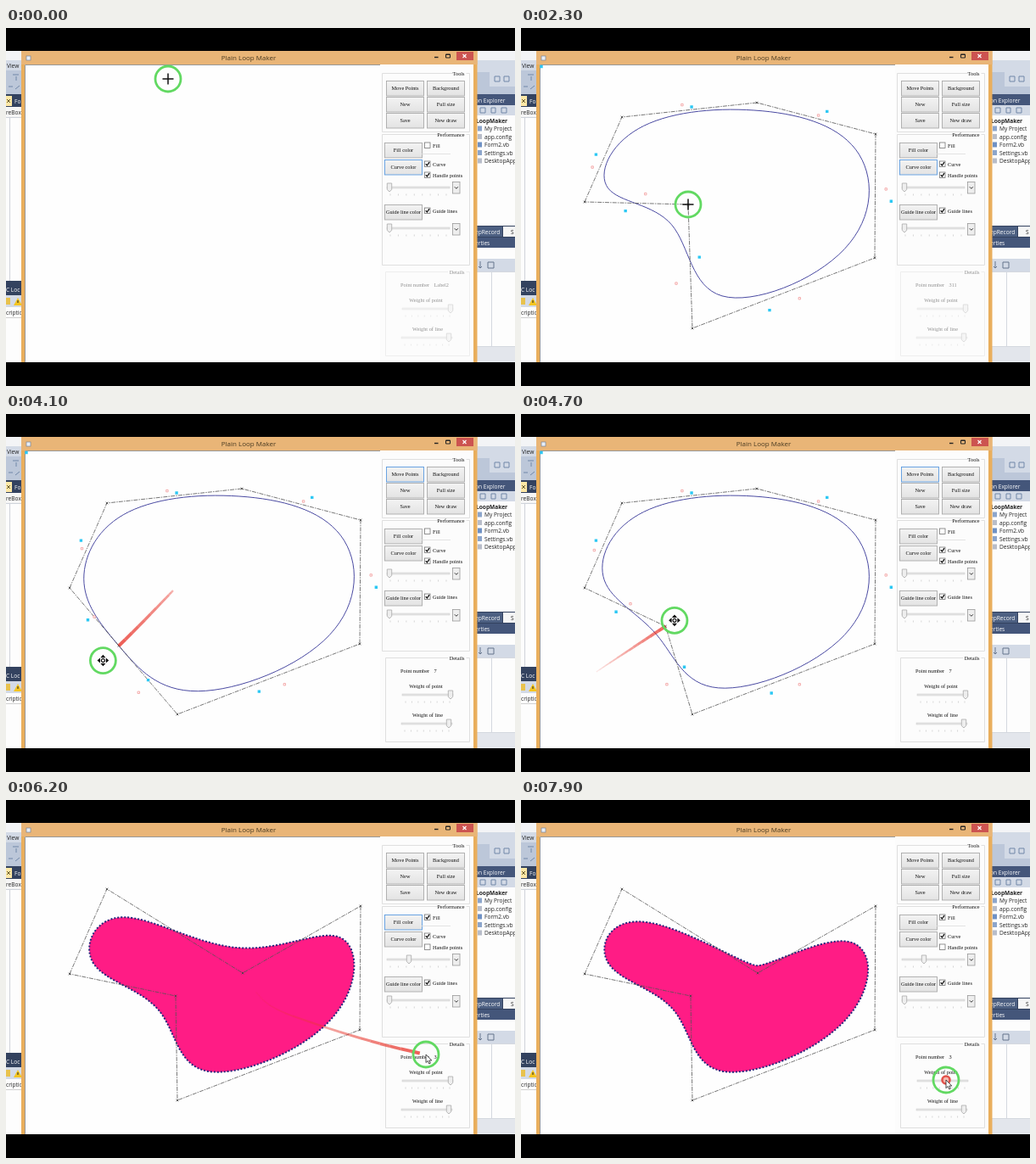
Recreate the animation shown at these times as an HTML page. Size 600 by 422 pixels, loop 8 s.

```html
<!DOCTYPE html>
<html lang="en">
<head>
<meta charset="utf-8">
<title>Spline drawing</title>
<style>
html, body { margin: 0; width: 100%; height: 100%; overflow: hidden; background: #000; }
svg { display: block; width: 100vw; height: 100vh; }
.ui { font: 6.3px "Liberation Serif", "Noto Serif", serif; fill: #111; }
.ide { font: 6.6px "Open Sans", "Noto Sans", sans-serif; fill: #222; }
.title { font: 8px "Open Sans", "Noto Sans", sans-serif; fill: #4a3b22; }
</style>
</head>
<body>
<svg id="stage" viewBox="0 0 600 422"></svg>
<script>
const LOOP = 8000;
const stage = document.getElementById('stage');

// ---- markup helpers ----
const rect = (x, y, w, h, fill, extra = '') =>
  `<rect x="${x}" y="${y}" width="${w}" height="${h}" fill="${fill}" ${extra}/>`;
const line = (d, stroke, extra = '') => `<path d="${d}" fill="none" stroke="${stroke}" ${extra}/>`;
const text = (x, y, str, cls = 'ui', extra = '') =>
  `<text x="${x}" y="${y}" class="${cls}" ${extra}>${str}</text>`;
const centered = 'text-anchor="middle"';

const button = (id, x, y, label) =>
  rect(x + .5, y + .5, 44, 17.5, 'url(#btn)', `id="${id}" stroke="#aaa" stroke-width=".9"`) +
  text(x + 22.5, y + 11, label, 'ui', centered);

const group = (x, y, w, h, label) => {
  const gap = label.length * 2.9;
  return line(`M${x + w - 5 - gap} ${y}H${x}V${y + h}H${x + w}V${y}h-4`, '#dcdcdc', 'stroke-width=".9"') +
    text(x + w - 6, y + 2, label, 'ui', 'text-anchor="end"');
};

const check = (id, y, label) =>
  rect(493.5, y - 3.5, 6.5, 6.5, '#fff', 'stroke="#777" stroke-width=".8"') +
  line(`M494.8 ${y - .3}l1.6 1.8 2.6 -3.8`, '#111', `id="${id}" stroke-width="1.3"`) +
  text(503, y + 2, label);

const thumb = (id, x, y) => `<path id="${id}" transform="translate(${x} ${y})"
  d="M-2.7 -5H2.7V2.5L0 5L-2.7 2.5Z" fill="#eee" stroke="#aaa" stroke-width=".8"/>`;
const slider = (id, x, y, w, at) => {
  let ticks = '';
  for (let i = 0; i < 8; i++) ticks += `M${x + 4 + i * (w - 8) / 7} ${y + 7.5}v2`;
  return rect(x, y - 1, w, 2, '#e4e4e4', 'stroke="#ccc" stroke-width=".5"') +
    line(ticks, '#ccc', 'stroke-width=".8"') + thumb(id, at, y);
};
const dropdown = y => rect(526.5, y + .5, 8.5, 13.5, '#eee', 'stroke="#999" stroke-width=".8"') +
  line(`M528.8 ${y + 6.3}l2 2 2 -2`, '#333', 'stroke-width="1"');

// ---- static scene ----
function backdrop() {
  const files = ['My Project', 'app.config', 'Form2.vb', 'Settings.vb', 'DesktopApp'];
  return rect(0, 27, 600, 367, '#fdfdfd') +
    // left edge
    rect(0, 27, 18, 11, '#f3f4f6') + rect(0, 38, 18, 12, '#d3dae6') + text(1, 47, 'View', 'ide') +
    rect(0, 50, 18, 28, '#bcc7d9') + line('M8 55h7M12 62v-5M3 69h5M11 72l5 -4', '#7187a8') +
    rect(0, 78, 18, 15, '#33425f') + rect(0, 80, 7, 12, '#ffe8a6') +
    line('M1 84l4 4m0 -4l-4 4', '#6b5a2a') + text(10, 89, 'Fo', 'ide', 'style="fill:#fff"') +
    rect(0, 93, 18, 12, '#f6f6f6') + text(0, 102, 'reBox2', 'ide') +
    line('M0 105.5h18M4.5 106v192', '#cfd3da') + rect(0, 298, 18, 17, '#33425f') +
    text(0, 311, 'C Loc', 'ide', 'style="fill:#fff"') + rect(0, 315, 18, 14, '#d3dae6') +
    rect(0, 318, 5, 8, '#e8c24d') + '<path d="M9 327l5 -9 5 9z" fill="#f4c520"/>' +
    line('M14 321v3', '#222') + text(0, 338, 'cription', 'ide') + line('M0 341.5h18', '#d0d0d0') +
    // right edge
    rect(555, 27, 45, 11, '#f3f4f6') + rect(555, 38, 45, 14, '#d3dae6') + rect(555, 52, 45, 26, '#bcc7d9') +
    rect(570, 51, 30, 18, '#d3dae6') +
    line('M576 57h6v6h-6zM587 57h6v6h-6z', '#7187a8') + rect(555, 78, 45, 13, '#44567a') +
    text(553, 88, 'on Explorer', 'ide', 'style="fill:#fff"') + rect(555, 91, 45, 12, '#d3dae6') +
    line('M559 94h6v6h-6zM572 94h5v6h-5zM584 94h6v6h-6z', '#7187a8') +
    text(554, 111.5, 'LoopMaker', 'ide', 'style="font-weight:bold"') +
    files.map((name, i) => rect(556, 115.5 + i * 9.5, 5, 6, ['#8ca5cb', '#b8bdc9', '#6f91c4'][i % 3]) +
      text(564, 121.3 + i * 9.5, name, 'ide')).join('') +
    rect(555, 233, 45, 14, '#33425f') + rect(555, 234, 30, 12, '#4d6082') +
    text(553, 243, 'epRecord', 'ide', 'style="fill:#fff"') + rect(586, 234, 14, 12, '#f6f6f6') +
    text(595, 243, 'S', 'ide') + rect(555, 247, 45, 12, '#44567a') +
    text(553, 256, 'erties', 'ide', 'style="fill:#fff"') + rect(555, 272, 45, 15, '#d3dae6') +
    line('M559 275v8m-2 -2l2 2 2 -2M568 276h7v7h-7z', '#65748c') +
    line('M555 287.5h45M572.5 288v87M555 375.5h45', '#d4d8df') + rect(555, 376, 45, 18, '#e3e6ec');
}

function appWindow() {
  return rect(18, 27, 537.5, 367, '#e9ae5c') + rect(18, 27, 537.5, 16, '#e9b577') +
    rect(22, 43, 529, 351, '#fefefe') +
    rect(441, 43, 110, 351, '#fcfcfc') + line('M22.5 394V43.5H441', '#8d8d8d', 'stroke-width=".9"') +
    rect(24, 33, 5, 5, '#e8eef7', 'stroke="#75839a" stroke-width=".7"') +
    text(286, 38, 'Plain Loop Maker', 'title', centered) +
    line('M505 34.5h4.5', '#222', 'stroke-width="1.4"') + line('M518.5 31h5v4h-5zM518.5 31.4h5', '#222') +
    rect(531, 28, 20, 10, '#cc5350') + line('M538.5 31l4 4m0 -4l-4 4', '#fff', 'stroke-width="1.2"');
}

function panel() {
  return group(443.5, 53.5, 103, 69, 'Tools') +
    button('movePoints', 448, 62, 'Move Points') + button('b2', 496, 62, 'Background') +
    button('b3', 448, 81, 'New') + button('b4', 496, 81, 'Full size') +
    button('b5', 448, 100, 'Save') + button('b6', 496, 100, 'New draw') +
    group(443.5, 125.5, 103, 154, 'Performance') +
    button('fillColor', 446, 135, 'Fill color') + button('curveColor', 446, 155, 'Curve color') +
    button('b9', 446, 208, 'Guide line color') +
    check('fillTick', 138.5, 'Fill') + line('M490 148.5h34', '#ddd', 'stroke-width=".8"') +
    check('curveTick', 160.5, 'Curve') + check('handleTick', 173.5, 'Handle points') +
    check('guideTick', 215.5, 'Guide lines') +
    slider('widthThumb', 449, 188, 74, 452) + dropdown(181) +
    slider('guideThumb', 449, 236, 74, 452) + dropdown(230) +
    `<g id="details">${group(447.5, 287.5, 99, 99, 'Details')}
      ${text(465, 305, 'Point number')}${text(504.5, 305, '', 'ui', 'id="number"')}
      ${text(495, 323, 'Weight of point', 'ui', centered)}
      ${slider('weightThumb', 467, 331, 60, 524)}
      ${text(497, 357, 'Weight of line', 'ui', centered)}
      ${slider('lineThumb', 466, 365, 60, 522)}</g>`;
}

function pointer() {
  const arrows = [0, 90, 180, 270].map(a =>
    `<path d="M0 -6.8L3 -3.4H-3Z" transform="rotate(${a})"/>`).join('');
  return `<g id="pointer">
    <circle r="15" fill="none" stroke="#62d962" stroke-width="2.8"/>
    <circle id="press" r="4.5" fill="#f4b9b0" stroke="#e2514a" stroke-width="2.6"/>
    <path id="cross" d="M-6.5 0H6.5M0 -6.5V6.5" stroke="#111" stroke-width="1.5"/>
    <g id="four"><circle r="7" fill="#fff"/>${arrows}
      <circle r="2" fill="#fff" stroke="#111" stroke-width="1.2"/></g>
    <path id="arrow" d="M0 0V9.5L2.2 7.5L3.8 11L5.4 10.2L3.8 7H6.8Z" fill="#fff" stroke="#222" stroke-width=".8"/>
  </g>`;
}

stage.innerHTML = `
  <defs>
    <linearGradient id="btn" x2="0" y2="1"><stop stop-color="#f3f3f3"/><stop offset="1" stop-color="#e3e3e3"/></linearGradient>
  </defs>
  ${backdrop()}${appWindow()}${panel()}
  <path id="curve"/>
  <path id="guide" fill="none" stroke="#555" stroke-width=".8" stroke-dasharray="5 1.2 1.4 1.2"/>
  <path id="marks" fill="none" stroke="#444" stroke-width=".8"/>
  <path id="cyan" fill="#2cc8f4"/>
  <path id="rose" fill="#fff" stroke="#f3a3a3" stroke-width=".9"/>
  <g id="trail"></g>
  ${pointer()}
  ${rect(0, 0, 600, 27, '#000')}${rect(0, 394, 600, 28, '#000')}`;
const el = {};
stage.querySelectorAll('[id]').forEach(node => { el[node.id] = node; });

// ---- motion ----
const path = [
  [0, 191, 60], [100, 178, 80], [300, 75, 205], [430, 75, 205], [640, 119, 105], [740, 119, 105],
  [930, 278, 88], [980, 278, 88], [1070, 352, 94], [1140, 402, 106], [1190, 417, 125], [1260, 417, 125],
  [1480, 417, 271], [1560, 417, 271], [1800, 202, 354], [1860, 202, 354], [2050, 197, 208],
  [2680, 197, 208], [3000, 410, 56], [3130, 470, 71], [3400, 470, 71], [3590, 370, 112],
  [3800, 197, 208], [3950, 197, 208], [4100, 115, 290], [4170, 64, 326], [4450, 80, 310],
  [4800, 200, 231], [4880, 200, 231], [5010, 284, 56], [5100, 278, 88], [5300, 270.5, 182],
  [5400, 279, 204], [5950, 279, 204], [6000, 308, 240], [6060, 362, 263], [6130, 440, 287],
  [6190, 495, 300], [6230, 495, 300], [6400, 523, 330], [6500, 523, 330], [7050, 478, 330],
  [7250, 478, 330], [7650, 501, 330], [8000, 501, 330]
];
const still = (a, b) => !a || !b || (a[1] === b[1] && a[2] === b[2]);

// Hermite path: zero speed at holds, smooth through the other stops
function slope(i, axis) {
  const a = path[i - 1], b = path[i], c = path[i + 1];
  return still(a, b) || still(b, c) ? 0 : (c[axis] - a[axis]) / (c[0] - a[0]);
}
function pointerAt(t) {
  t = Math.max(0, t);
  let i = 0;
  while (i < path.length - 2 && path[i + 1][0] <= t) i++;
  const a = path[i], b = path[i + 1], span = b[0] - a[0], u = (t - a[0]) / span;
  const s = u * u * (3 - 2 * u), m0 = u * (1 - u) * (1 - u) * span, m1 = u * u * (u - 1) * span;
  return [1, 2].map(k => a[k] + (b[k] - a[k]) * s + slope(i, k) * m0 + slope(i + 1, k) * m1);
}

const placed = [
  [350, 75, 205], [690, 119, 105], [955, 278, 88], [1235, 418, 125],
  [1520, 417, 271], [1830, 202, 354], [2100, 197, 208]
];
const PICK_LAST = 3920, DROP_LAST = 4850, PICK_TOP = 5128, DROP_TOP = 5450, RESTYLE = 5600, DRAG = 6450;
const LAG = 28;

function controlPoints(t) {
  const pts = placed.filter(p => p[0] <= t).map(p => [p[1], p[2]]);
  if (t > PICK_LAST) pts[6] = pointerAt(Math.min(t, DROP_LAST) - LAG);
  if (t > PICK_TOP) pts[2] = pointerAt(Math.min(t, DROP_TOP) - LAG);
  return pts;
}

const at = (pts, i) => pts[(i + pts.length) % pts.length];
const pair = p => p.map(v => v.toFixed(2)).join(' ');
const mix = (a, b, u) => a.map((v, k) => v + (b[k] - v) * u);
const outline = pts => pts.length ? 'M' + pts.map(pair).join('L') + 'Z' : '';

// Closed cubic spline as Beziers: a heavier third point shortens its share of both edges
function spline(pts, weight) {
  const share = i => i % pts.length === 2 ? 1 / weight : 1;
  const edges = pts.map((p, i) => {
    const next = at(pts, i + 1), total = share(i) + 1 + share(i + 1);
    return [mix(p, next, share(i) / total), mix(next, p, share(i + 1) / total)];
  });
  const knot = i => mix(at(edges, i - 1)[1], at(edges, i)[0], .5);
  return 'M' + pair(knot(0)) +
    edges.map(([c1, c2], i) => `C${pair(c1)} ${pair(c2)} ${pair(knot(i + 1))}`).join('') + 'Z';
}

const handle = (near, far, beyond) => [0, 1].map(k => (8 * near[k] + 5 * far[k] - beyond[k]) / 12 + 1);
const squares = (list, r) => list.map(([x, y]) => `M${x - r} ${y - r}h${2 * r}v${2 * r}h${-2 * r}z`).join('');
const show = (node, on) => node.setAttribute('display', on ? 'inline' : 'none');
const set = (node, attrs) => { for (const k in attrs) node.setAttribute(k, attrs[k]); };

function drawTrail(t) {
  const span = 190, parts = 18;
  let html = '';
  for (let i = 0; i < parts; i++) {
    const t0 = t - LAG - span * (1 - i / parts);
    if (t0 < 0) continue;
    const a = pointerAt(t0), b = pointerAt(t0 + span / parts);
    if (Math.hypot(a[0] - b[0], a[1] - b[1]) < .4) continue;
    const f = (i + 1) / parts;
    html += line(`M${a}L${b}`, '#e8392f', `stroke-width="${1 + 3 * f}" opacity="${.08 + .72 * f}"`);
  }
  el.trail.innerHTML = html;
}

function render(t) {
  const pts = controlPoints(t), styled = t >= RESTYLE;
  const [x, y] = pointerAt(t);
  const slide = t > DRAG ? Math.min(524, x + 1) : 524;
  const weight = 1 + (524 - slide) * .16;

  set(el.guide, { d: outline(pts) });
  set(el.marks, { d: pts.map(([a, b]) => `M${a - 1.3} ${b - 1.3}l2.6 2.6m0 -2.6l-2.6 2.6`).join('') });
  set(el.curve, {
    d: pts.length > 3 ? spline(pts, weight) : '',
    fill: styled ? '#ff1c85' : 'none',
    stroke: styled ? '#26267c' : '#4a4aa2',
    'stroke-width': styled ? 2 : 1,
    'stroke-dasharray': styled ? '2 2' : 'none'
  });

  const handles = pts.length > 3 && !styled;
  const edges = handles ? pts.map((_, i) => [-1, 0, 1, 2].map(k => at(pts, i + k))) : [];
  const cyan = edges.map(([, a, b, next]) => handle(b, a, next));
  if (handles) cyan.push([24, 45.5]);
  set(el.cyan, { d: squares(cyan, 1.7) });
  set(el.rose, { d: squares(edges.map(([prev, a, b]) => handle(a, b, prev)), 1.2) });

  const focus = t > DRAG ? '' : styled ? 'fillColor' : t < 3200 ? 'curveColor' : 'movePoints';
  for (const id of ['fillColor', 'curveColor', 'movePoints'])
    set(el[id], { stroke: id === focus ? '#5b9be0' : '#aaa' });
  show(el.fillTick, styled);
  show(el.handleTick, !styled);
  set(el.widthThumb, { transform: `translate(${styled ? 475 : 452} 188)` });
  set(el.weightThumb, { transform: `translate(${slide} 331)` });
  set(el.details, { opacity: t < PICK_LAST ? .45 : 1 });
  el.number.textContent = t < 350 ? 'Label2' : t < 1830 ? '13' : t < PICK_LAST ? '311' : t < PICK_TOP ? '7' : '3';

  drawTrail(t);
  const onPanel = x > 441, pressed = placed.some(p => Math.abs(t - p[0]) < 50) ||
    Math.abs(t - 3250) < 60 || t > DRAG;
  set(el.pointer, { transform: `translate(${x} ${y})` });
  show(el.press, pressed);
  show(el.arrow, onPanel);
  show(el.cross, !onPanel && t < 3200);
  show(el.four, !onPanel && t >= 3200);
}

const start = performance.now();
function tick() {
  render((performance.now() - start) % LOOP);
  requestAnimationFrame(tick);
}
tick();
</script>
</body>
</html>
```
